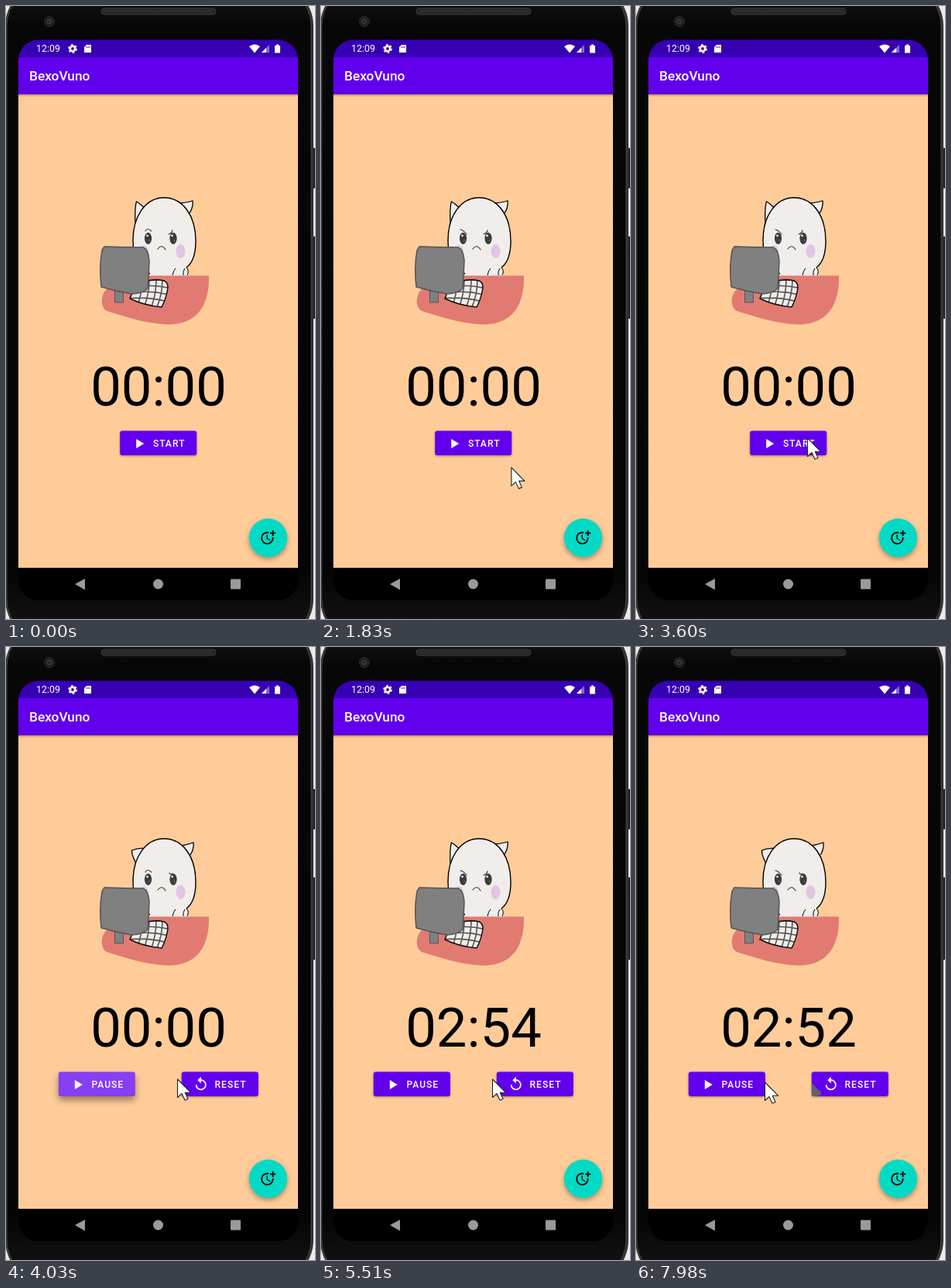
An HTML page for the animation above (8000 ms loop, 399 px wide and 790 px high).

```html
<!DOCTYPE html>
<html lang="en">
<head>
<meta charset="utf-8">
<title>Focus timer</title>
<style>
  html, body { margin: 0; width: 100%; height: 100%; overflow: hidden; background: #eee8e8; }
  svg { display: block; width: 399px; height: 790px; font-family: Roboto, sans-serif; }
  .label { font-size: 12px; font-weight: 500; letter-spacing: 1.07px; fill: #fff; }
  .button { filter: drop-shadow(0 1.5px 1.5px #0006); }
  .raised { filter: drop-shadow(0 5px 4px #0006); }
  .fab { filter: drop-shadow(0 3px 3px #0005); }
  .ink { fill: none; stroke: #3a3a3a; stroke-width: 1.2; stroke-linecap: round; }
  .skin { fill: #f0edeb; stroke: #000; stroke-width: 1.3; stroke-linejoin: round; }
</style>
</head>
<body>
<svg viewBox="0 0 399 790">
  <defs>
    <linearGradient id="bezel" x2="0" y2="1">
      <stop offset="0" stop-color="#1b1b1b"/>
      <stop offset=".06" stop-color="#070707"/>
      <stop offset=".9" stop-color="#050505"/>
      <stop offset="1" stop-color="#171717"/>
    </linearGradient>
    <linearGradient id="barShadow" x2="0" y2="1">
      <stop offset="0" stop-opacity=".28"/>
      <stop offset="1" stop-opacity="0"/>
    </linearGradient>
    <clipPath id="screen"><rect x="16" y="43.500" width="361" height="722.500" rx="26"/></clipPath>
    <path id="keyboard" d="M160 377Q165 362 176 356Q190 351 204 354Q209 356 209 363Q207 377 201 388Q178 386 160 377Z"/>
    <clipPath id="keys"><use href="#keyboard"/></clipPath>
  </defs>

  <!-- phone -->
  <path d="M396 183h3v52h-3zM396 297h3v106h-3z" fill="#222"/>
  <rect x="-1" y="-30" width="398" height="850" rx="56" fill="#333"/>
  <rect x="1" y="-28" width="393" height="846" rx="54" fill="url(#bezel)" stroke="#444"/>
  <rect x="123" y="3" width="148" height="8" rx="4" fill="#262626" stroke="#3c3c3c"/>
  <path d="M127 7h140" stroke="#333" stroke-width="4" stroke-dasharray="1 1"/>
  <circle cx="56" cy="20" r="6.5" fill="#202020" stroke="#2a2a2a"/>
  <circle cx="56" cy="20" r="2.8" fill="#26282c" stroke="#444"/>

  <g clip-path="url(#screen)">
    <rect y="43" width="399" height="723"/>
    <rect y="113.500" width="399" height="610.500" fill="#ffcc99"/>
    <rect y="113.500" width="399" height="4" fill="url(#barShadow)"/>
    <rect y="66" width="399" height="47.500" fill="#6200ee"/>
    <rect y="43" width="399" height="23" fill="#3700b3"/>
  </g>

  <!-- status bar, title and navigation -->
  <g fill="#fff">
    <text x="39" y="59" font-size="12.4">12:09</text>
    <circle cx="86" cy="55" r="3.2" fill="none" stroke="#fff" stroke-width="2.6"/>
    <circle cx="86" cy="55" r="5" fill="none" stroke="#fff" stroke-width="1.8" stroke-dasharray="2.6 2.636"/>
    <path d="M104 50h6v10h-9v-7z"/>
    <path d="M104 52v2m2-2v2m2-2v2" stroke="#3700b3" stroke-width=".9"/>
    <path d="M314 52Q321 47 328 52L321 60.500Z"/>
    <path d="M340 50v10h-10z" opacity=".4"/>
    <path d="M336 54v6h-6z"/>
    <path d="M347 51h2v-1.500h3V51h2v9.500h-7z"/>
    <text x="30" y="96" font-size="17.3" font-weight="500">BexoVuno</text>
  </g>
  <g fill="#9a9a9a">
    <path d="M102 738v14.500L89 745z"/>
    <circle cx="196.500" cy="745" r="6.500"/>
    <rect x="290" y="738.500" width="13" height="13" rx="1"/>
  </g>

  <!-- character at the desk -->
  <path id="leftEar" class="skin"/>
  <path id="rightEar" class="skin"/>
  <path d="M186 348C170 338 164 320 164 302C164 271 180 247 204 247C229 247 245 271 245 303C245 320 241 331 233 337L236 348Z" fill="#f0edeb"/>
  <path d="M186 345C170 338 164 320 164 302C164 271 180 247 204 247C229 247 245 271 245 303C245 320 241 331 233 337" fill="none" stroke="#000" stroke-width="1.400"/>
  <path d="M215 347Q216 341 219 338M233 337Q237 341 234 347M229 347Q228 342 231 338" fill="none" stroke="#000"/>
  <ellipse cx="178" cy="317" rx="6" ry="8.500" fill="#e1c5e5"/>
  <ellipse cx="225.500" cy="316" rx="6" ry="9" fill="#e1c5e5"/>
  <g fill="#3b3b3b">
    <ellipse cx="183.500" cy="299.500" rx="4.600" ry="7.600"/>
    <ellipse cx="216" cy="299.500" rx="4.600" ry="7.600"/>
  </g>
  <g fill="#fff">
    <circle cx="182.500" cy="296" r="1.300"/><circle cx="185" cy="302" r=".5"/>
    <circle cx="214.500" cy="296" r="1.300"/><circle cx="217.500" cy="302" r=".5"/>
  </g>
  <path id="leftBrow" class="ink"/>
  <path id="rightBrow" class="ink"/>
  <path class="ink" d="M196 313Q201 306 206 314"/>
  <path d="M150 347.500H262C263 388 245 411 208 410.500C178 409 150 399 130 393C121 388 122 371 131 364Z" fill="#e17b72"/>
  <g clip-path="url(#keys)">
    <use href="#keyboard" fill="#f0edeb"/>
    <path d="M160 364Q188 357 212 364M158 371Q184 365 210 372M156 377Q184 374 208 381M176 352Q176 370 169 388M185 352Q185 371 178 389M194 352Q194 372 187 390M202 352Q202 373 194 390" fill="none" stroke="#555" stroke-width="1.600"/>
  </g>
  <use href="#keyboard" fill="none" stroke="#111" stroke-width="1.500"/>
  <g fill="#808080" stroke="#555" stroke-width="1.500" stroke-linejoin="round">
    <path d="M140.500 365h11v17h-11z" stroke-width="1"/>
    <path d="M127 310Q153 311 177 311Q184 314 185 328Q184 350 183 364Q178 370 163 371Q143 368 123 362Q120 337 124 315Z"/>
  </g>

  <text id="clock" x="197" y="514.800" font-size="70.500" text-anchor="middle"></text>
  <g id="idle"></g>
  <g id="running"></g>

  <circle class="fab" cx="338.500" cy="685.300" r="24.700" fill="#03dac5"/>
  <path transform="translate(327.500 674) scale(.9)" d="M10 8v6l4.700 2.900.8-1.200-4-2.400V8zM17.920 12c.05.33.08.66.08 1 0 3.900-3.100 7-7 7s-7-3.100-7-7 3.100-7 7-7c.7 0 1.370.1 2 .29V4.230c-.64-.15-1.310-.23-2-.23-5 0-9 4-9 9s4 9 9 9 9-4 9-9c0-.34-.02-.67-.06-1zM20 5V2h-2v3h-3v2h3v3h2V7h3V5z"/>

  <path id="smudge" d="M227 562L239 574V577L233 579H229Q227 579 227 577Z" fill="#626066"/>
  <path id="cursor" d="M0 0V23.500L5.500 18.500L9.500 27L13.500 25.500L9.800 17.200H17Z" fill="#fff" stroke="#222" stroke-width="1.100" stroke-linejoin="round"/>
</svg>
<script>
const LOOP = 8000;
const $ = id => document.getElementById(id);

const PLAY = '<path d="M21 10v12l10-6z" fill="#fff"/>';
const RESTART = '<path transform="translate(14.500 5) scale(.87)" fill="#fff" d="M12 5V1L7 6l5 5V7c3.310 0 6 2.690 6 6s-2.690 6-6 6-6-2.690-6-6H4c0 4.420 3.580 8 8 8s8-3.580 8-8-3.580-8-8-8z"/>';
const button = (x, label, icon, id) => `
  <g transform="translate(${x} 548)">
    <rect id="${id}" class="button" y="-.4" width="99" height="31.500" rx="3" fill="#6200ee"/>
    ${icon}<text class="label" x="42.700" y="20.200">${label}</text>
  </g>`;
$('idle').innerHTML = button(147.2, 'START', PLAY, 'start');
$('running').innerHTML = button(67.8, 'PAUSE', PLAY, 'pause') + button(226.8, 'RESET', RESTART, 'reset');

// time, x, y of the pointer tip
const track = [
  [620, 347, 752], [1010, 291, 659], [1280, 271, 634], [1450, 271, 634],
  [2200, 221.5, 557], [7650, 221.5, 557], [7900, 166.5, 561], [LOOP, 166.5, 561]
];
const ticks = [[7080, '02:52'], [6050, '02:53'], [5000, '02:54'], [4090, '02:55'], [0, '00:00']];

function pointer(t) {
  const i = track.findIndex(p => p[0] > t);
  const [a, x, y] = track[i - 1], [b, u, v] = track[i];
  const k = (t - a) / (b - a);
  return `translate(${x + (u - x) * k} ${y + (v - y) * k})`;
}

// true while the repeating time lies between from and to
const within = (t, period, from, to) => t % period >= from && t % period < to;
const show = (id, on) => $(id).style.display = on ? '' : 'none';

function draw(t) {
  const flared = within(t, 300, 115, 195);
  const frowning = within(t, 340, 55, 235);
  $('leftEar').setAttribute('d', flared
    ? 'M168 279Q162 268 162.500 262Q172 258 182 260'
    : 'M167 279Q166 260 168.500 252Q174 255 181 263');
  $('rightEar').setAttribute('d', flared
    ? 'M227 256Q236 254 242 252Q243 260 238 268'
    : 'M225 254Q235 253 241 251Q242 259 237 267');
  $('leftBrow').setAttribute('d', frowning ? 'M180 288Q184 289 188 294' : 'M180 290Q183 285 187.500 290');
  $('rightBrow').setAttribute('d', flared ? 'M211 291Q212 294 215 292' : 'M210 294Q214 293 215 289');

  const started = t >= 3810;
  show('idle', !started);
  show('running', started);
  const glow = Math.max(0, Math.min(1, (4450 - t) / 250));
  $('pause').setAttribute('fill', `rgb(${98 + 38 * glow} ${62 * glow} ${238 + 4 * glow})`);
  $('pause').setAttribute('class', glow > 0 ? 'raised' : 'button');

  $('clock').textContent = ticks.find(k => t >= k[0])[1];
  const visible = t >= track[0][0];
  show('cursor', visible);
  if (visible) $('cursor').setAttribute('transform', pointer(t));
  show('smudge', t >= 7780);
}

function frame() {
  draw(performance.now() % LOOP);
  requestAnimationFrame(frame);
}
frame();
</script>
</body>
</html>
```
